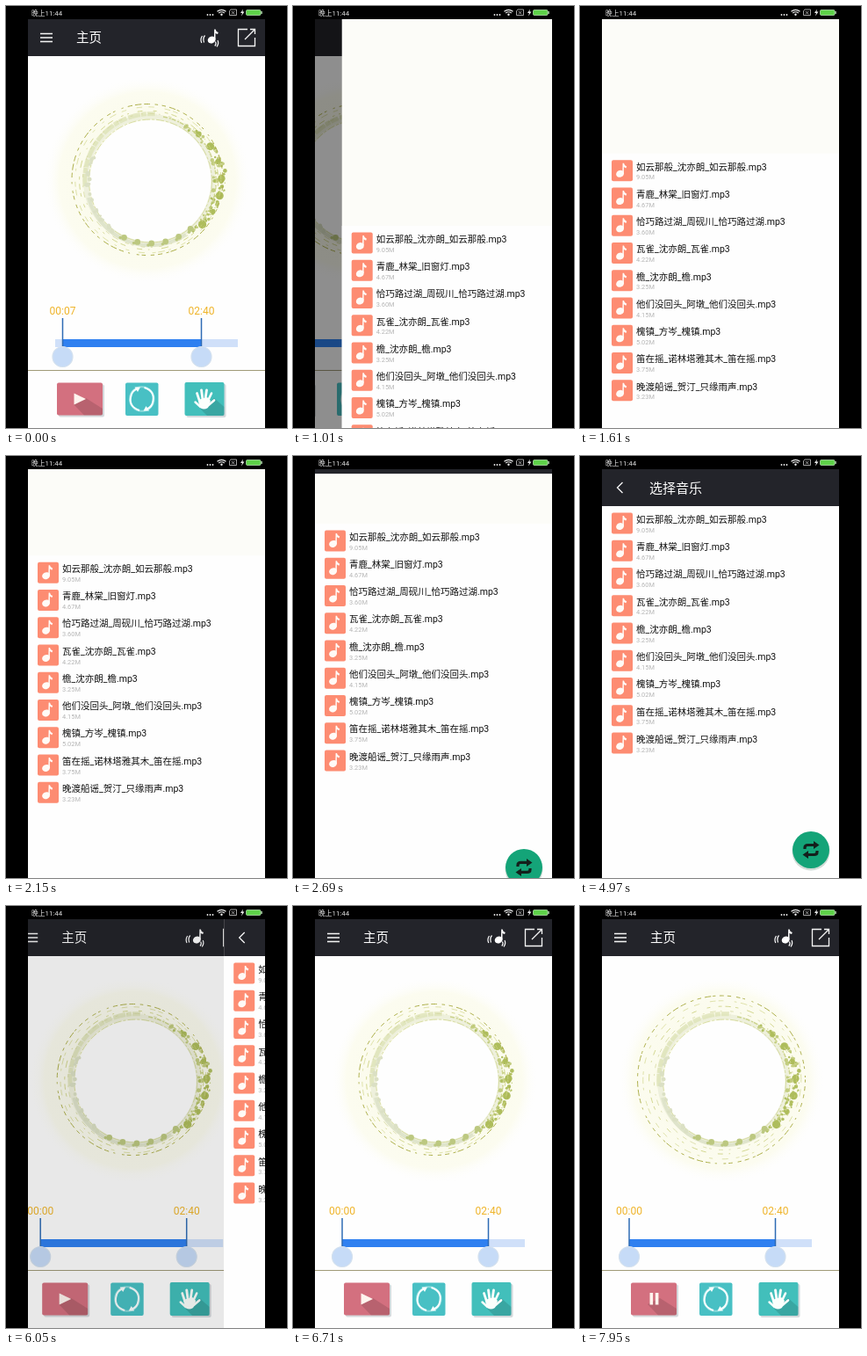
These frames come from a looping animation (320 px wide and 480 px high, 8000 ms). An HTML page:

```html
<!DOCTYPE html>
<html lang="zh-CN">
<head>
<meta charset="utf-8">
<title>Music picker</title>
<style>
html, body { margin: 0; width: 100%; height: 100%; overflow: hidden; background: #000; }
svg { display: block; width: 100%; height: 100%; }
text { font-family: Roboto, "Noto Sans CJK SC", "Noto Sans CJK", "Noto Sans", sans-serif; }
</style>
</head>
<body>
<svg id="stage" viewBox="0 0 320 480"></svg>
<script>
const LOOP = 8000;
const stage = document.getElementById('stage');

const rect = (x, y, w, h, fill, more = '') =>
  `<rect x="${x}" y="${y}" width="${w}" height="${h}" fill="${fill}" ${more}/>`;
const circle = (x, y, r, more) => `<circle cx="${x}" cy="${y}" r="${r}" ${more}/>`;
const line = (d, color, w = 1, more = '') =>
  `<path d="${d}" fill="none" stroke="${color}" stroke-width="${w}" ${more}/>`;
const shape = (d, fill, more = '') => `<path d="${d}" fill="${fill}" ${more}/>`;
const label = (x, y, size, fill, str, more = '') =>
  `<text x="${x}" y="${y}" font-size="${size}" fill="${fill}" ${more}>${str}</text>`;
const group = (id, content, more = '') => `<g id="${id}" ${more}>${content}</g>`;

let seed = 11;
const rnd = () => (seed = (seed * 16807) % 2147483647) / 2147483647;

const BAR = '#23242a';
const songs = [
  ['如云那般_沈亦朗_如云那般', '9.05M'],
  ['青鹿_林棠_旧窗灯', '4.67M'],
  ['恰巧路过湖_周砚川_恰巧路过湖', '3.60M'],
  ['瓦雀_沈亦朗_瓦雀', '4.22M'],
  ['檐_沈亦朗_檐', '3.25M'],
  ['他们没回头_阿墩_他们没回头', '4.15M'],
  ['槐镇_方岑_槐镇', '5.02M'],
  ['笛在摇_诺林塔雅其木_笛在摇', '3.75M'],
  ['晚渡船谣_贺汀_只缘雨声', '3.23M']
];

function statusBar() {
  return rect(0, 0, 320, 15, '#000') +
    label(29, 10.8, 7.8, '#e6e6e6', '晚上11:44') +
    [229.5, 232.5, 235.5].map(x => circle(x, 10, .9, 'fill="#eee"')).join('') +
    line('M240.5 6.2Q245.5 2.4 250.5 6.2M242.2 8Q245.5 5.5 248.8 8', '#eee', 1.2) +
    circle(245.5, 9.8, 1.2, 'fill="#eee"') +
    line('M256 4H262.5V10.5H254.5V5.5ZM257 6L260.2 9.2M260.2 6L257 9.2', '#ccc', .8) +
    shape('M270 3.5L267 8H269L268 11.5L271.5 6.6H269.4Z', '#eee') +
    rect(273.5, 4.5, 16.5, 6, '#5fd24a', 'rx="1.2" stroke="#c4ecc0" stroke-width=".7"') +
    rect(290.4, 6, 1.3, 3, '#c4ecc0');
}

// A note whose stem top is at x, y.
function note(x, y, fill) {
  return `<g transform="translate(${x} ${y})">` +
    shape('M0 0H1.4Q1.6 2.4 4.6 3.6L3.8 5.6Q2.2 5 1.3 4.2V11H-.3Z', fill) +
    `<ellipse cx="-3" cy="12" rx="4.6" ry="3.9" fill="${fill}" transform="rotate(-25 -3 12)"/></g>`;
}

function ringArt() {
  const cx = 164.5, cy = 199;
  let out = circle(161, 198, 118, 'fill="url(#glow)"');
  out += circle(cx - 1.5, cy - 1, 72, 'fill="none" stroke="#eef0dc" stroke-width="6"');
  out += line('M90 205A75 75 0 0 1 172 123', '#dfe4b8', 5, 'opacity=".8" stroke-dasharray="14 1 6 1 9 2"');
  out += line('M94 218A73 73 0 0 0 205 260', '#dde2c8', 4, 'opacity=".85"');
  out += line('M179 126A74 74 0 0 1 222 246', '#ccd38c', 1.5, 'stroke-dasharray="5 2 2 1"');
  out += circle(cx, cy, 69, 'fill="#fefefe"');
  out += circle(cx, cy, 70, 'fill="none" stroke="#d3d99a" stroke-width=".9" stroke-dasharray="9 2 3 2"');
  const dot = (deg, r, size, color) => {
    const a = deg * Math.PI / 180;
    return circle((cx + r * Math.cos(a)).toFixed(1), (cy + r * Math.sin(a)).toFixed(1),
      size.toFixed(1), `fill="${color}"`);
  };
  for (let i = 0; i < 100; i++) {
    const deg = -58 + 108 * rnd();
    const near = 1 - Math.abs(deg + 4) / 60;
    out += dot(deg, 72 + rnd() * (3 + 12 * near), .5 + rnd() * (1 + 1.2 * near), rnd() < .5 ? '#b0bf60' : '#c3cd80');
  }
  for (let deg = -44; deg < 52; deg += 14)
    out += dot(deg, 76 + 5 * Math.cos(deg / 30), 2.8 + rnd() * 1.8, '#aebd5c');
  for (let deg = 50; deg < 125; deg += 13) {
    out += dot(deg, 71, 3.4, '#bcc880');
    out += dot(deg + 3, 73, 1.8, '#bcc880');
  }
  for (let i = 0; i < 28; i++)
    out += dot(125 + rnd() * 80, 69 + rnd() * 4, 1 + rnd() * 1.6, '#dbe0c4');
  return out;
}

const dashes = [
  { r: 86, grow: 9.5, w: 1, color: '#aeb04c', gap: 8 },
  { r: 83, grow: 7, w: .7, color: '#d2d68c', gap: 12 },
  { r: 79, grow: 5, w: .8, color: '#c8cd78', gap: 13 },
  { r: 76, grow: 3, w: .8, color: '#d5d9a0', gap: 9 }
];

function dashRing(d, i) {
  const pattern = Array.from({ length: 24 }, (_, k) => (1.5 + rnd() * (k % 2 ? d.gap : 7)).toFixed(1));
  return circle(161 + i * .8, 197.5 + i * .3, d.r,
    `id="dash${i}" fill="none" stroke="${d.color}" stroke-width="${d.w}" stroke-dasharray="${pattern.join(' ')}"`);
}

function buttons() {
  const tile = (x, y, w, h, color, shade) =>
    rect(x + 2, y + 2, w, h, '#71808a', 'opacity=".3" rx="2"') + rect(x, y, w, h, color, 'rx="2"') +
    shape(shade, '#000', 'opacity=".13"');
  const finger = (d, w) => line(d, '#fbfffc', w, 'stroke-linecap="round"');
  return tile(58, 428.5, 52, 37, '#d3707f', 'M77 453L91 446L110 458V465.5H89Z') +
    group('play', shape('M77.5 440.5V453.5L91 447Z', '#fff4ee')) +
    group('pause', rect(79.5, 440, 3.6, 13.5, '#fff4ee') + rect(85.8, 440, 3.6, 13.5, '#fff4ee')) +
    rect(136, 428.5, 37.5, 37.5, '#48c0c4', 'rx="2"') +
    circle(154.7, 447, 13.8, 'fill="none" stroke="#8bdadb" stroke-width="2"') +
    line('M152 460Q140 456 142 445Q143 438 149 435.5M157.5 434Q169.5 438 167.5 449Q166.5 456 160.5 458.5', '#f8ffff', 2) +
    shape('M146.5 433.5L153 433.5L150 439ZM163 460.5L156.5 460.5L159.5 455Z', '#f8ffff') +
    tile(203.5, 428, 45, 38, '#42bfbb', 'M221 458L237 446L248.5 456V466H229Z') +
    shape('M219 448L229 445L233 449L230 457Q224 460.5 220.5 456Z', '#fbfffc') +
    finger('M221 451L217.5 440.5', 2.7) + finger('M224 448L222.5 436.8', 2.8) + finger('M227 447L228.5 437', 2.8) +
    finger('M230 449L234 440.5', 2.6) + finger('M230 454.5L237 448.5', 2.7) + finger('M221.5 456L215.5 450.5', 2.4);
}

function mainPage() {
  const knob = (id, x, str) => group(id,
    line('M0 355V388', '#2e6bb4', 1.5) +
    circle(0, 399, 11.5, 'fill="#c6dbf7" stroke="#d3e0ee" stroke-width="1.2"') +
    label(0, 351, 12, '#efb42a', str, 'text-anchor="middle"'), `transform="translate(${x})"`);
  return rect(0, 15, 345, 465, '#fefefe') + rect(0, 15, 345, 42, BAR) +
    line('M39 31.5H53M39 36H53M39 40.5H53', '#f6f6f6', 1.5) +
    label(80, 41.3, 14.5, '#fff', '主页') +
    note(237.2, 26.5, '#fff') +
    line('M226.5 33.5Q223.8 36.5 225.5 41.5M223.5 34Q220.8 38 222.8 42M238.5 40.5Q240 43 237.8 45.5M241 39Q242.8 42.5 240 46.3', '#fff', 1.2) +
    line('M275 26.5H264.5V45.5H283.5V36M278 26.5H283.5V32M283 27L272 38', '#f6f6f6', 1.3) +
    ringArt() + dashes.map(dashRing).join('') +
    rect(56, 379, 208, 9, '#d0e0f9') +
    '<rect id="range" y="379" height="9" fill="#2f80f0"/>' +
    knob('from', 56, '00:00') + knob('to', 222.5, '02:40') +
    rect(0, 414, 345, 1, '#a09a78') + buttons();
}

function songRow([name, size], i) {
  return `<g transform="translate(0 ${(i * 31.25).toFixed(2)})">` +
    rect(36, 64.5, 24, 24, '#fd8c72', 'rx="2"') +
    note(48.6, 68, '#fffaf6') +
    label(64, 75.8, 10.5, '#101010', name + '.mp3') +
    label(64, 86.7, 7.4, '#b4b4b4', size) + '</g>';
}

function listPage() {
  const fab = circle(263, 450, 21.5, 'fill="#8fa89c" opacity=".4"') + circle(263, 448, 21, 'fill="#14a478"') +
    line('M256 447V445.5Q256 442.5 259.5 442.5H267M270 449V450.5Q270 453.5 266.5 453.5H259', '#14201c', 3.2) +
    shape('M266 438L272.5 442.5L266 447ZM260 449L253.5 453.5L260 458Z', '#14201c');
  return rect(25, 15, 270, 465, '#fcfcf8') +
    group('body', rect(25, 57, 270, 423, '#fefefe') + songs.map(songRow).join('') + fab) +
    group('head', rect(25, 15, 270, 42, BAR) + line('M48.5 30L42.5 36L48.5 42', '#f6f6f6', 1.3) +
      label(79, 41.5, 15, '#fff', '选择音乐'));
}

stage.innerHTML =
  `<defs><clipPath id="screen"><rect x="25" y="15" width="270" height="465"/></clipPath>
  <radialGradient id="glow"><stop offset=".6" stop-color="#fbfbec"/><stop offset=".85" stop-color="#fcfcf0"/>
  <stop offset="1" stop-color="#fefefe" stop-opacity="0"/></radialGradient></defs>` +
  rect(0, 0, 320, 480, '#000') +
  `<g clip-path="url(#screen)">${group('main', mainPage())}${rect(25, 15, 270, 465, '#000', 'id="dim"')}${group('list', listPage())}</g>` +
  statusBar();

const el = id => document.getElementById(id);
const set = (id, name, value) => el(id).setAttribute(name, value);
const move = (id, x, y = 0) => set(id, 'transform', `translate(${x.toFixed(2)} ${y.toFixed(2)})`);
const clamp = v => Math.min(1, Math.max(0, v));
const easeOut = (t, start, length) => 1 - (1 - clamp((t - start) / length)) ** 2;

function draw(t) {
  // How much of the main page the list page covers.
  const cover = easeOut(t, 50, 1450) - easeOut(t, 5200, 1458);
  move('main', -97 * cover);
  set('dim', 'opacity', (.5 * cover).toFixed(3));
  move('list', 270 * (1 - cover));

  const away = 1 - easeOut(t, 0, 3486);
  move('body', 0, 383 * away);
  move('head', 0, -709 * away);

  const early = t < 2000;
  const x = early ? 64.5 : 56;
  move('from', x);
  el('from').querySelector('text').textContent = early ? '00:07' : '00:00';
  set('range', 'x', x);
  set('range', 'width', 222.5 - x);

  const playing = t >= 7560;
  set('play', 'opacity', playing ? 0 : 1);
  set('pause', 'opacity', playing ? 1 : 0);
  const beat = easeOut(t, 7560, 380);
  dashes.forEach((d, i) => {
    const wobble = playing ? Math.sin((7950 - t) / 45 + i * Math.PI) * 1.2 : 0;
    set('dash' + i, 'r', (d.r + d.grow * beat + wobble * beat).toFixed(2));
  });
}

const start = performance.now();
function tick() {
  draw((performance.now() - start) % LOOP);
  requestAnimationFrame(tick);
}
draw(0);
requestAnimationFrame(tick);
</script>
</body>
</html>
```
